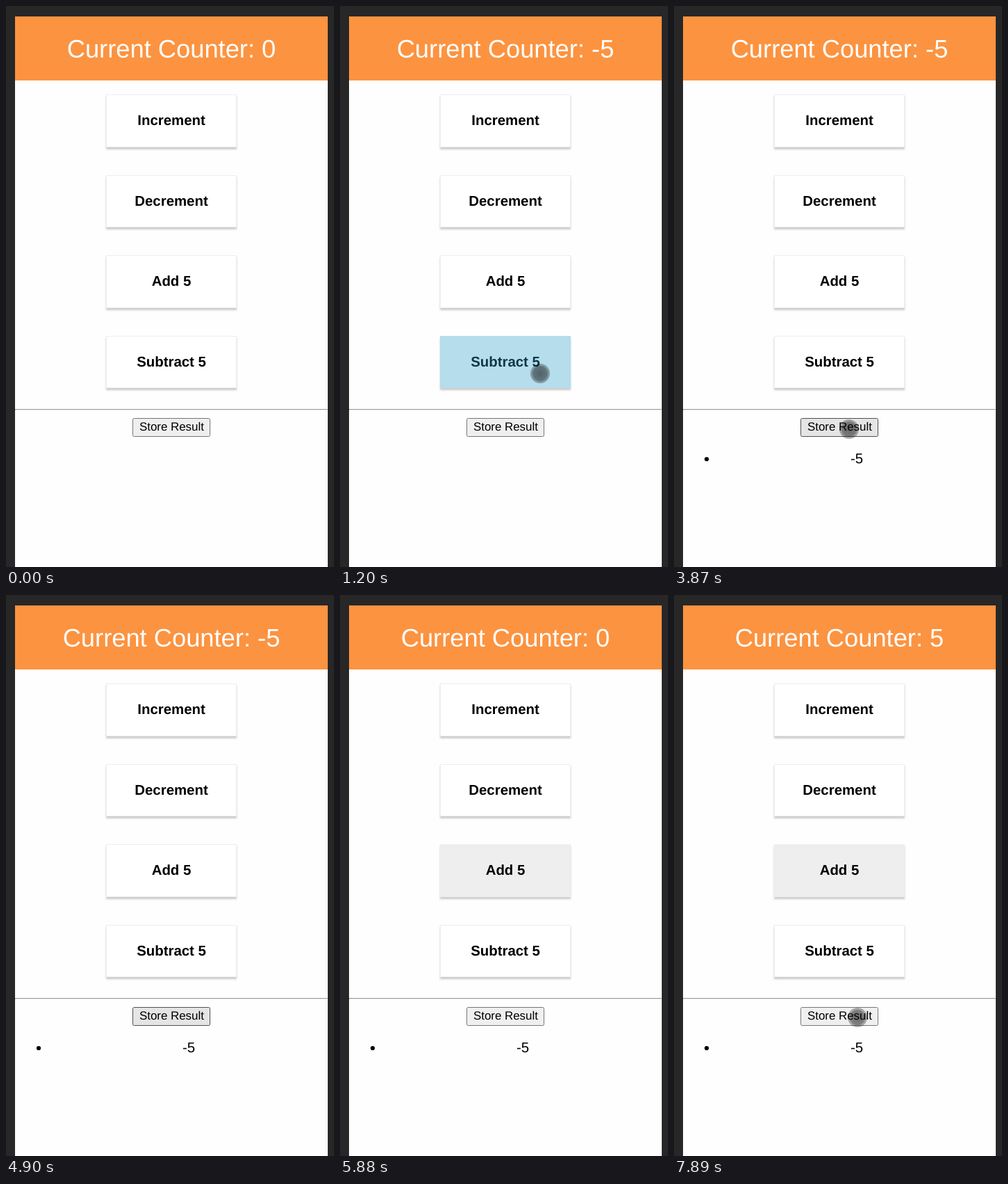
An HTML page that plays this animation: 472x806 px, repeating every 8000 ms.

```html
<!DOCTYPE html>
<html lang="en">
<head>
<meta charset="utf-8">
<title>Counter</title>
<style>
  html, body { margin: 0; width: 100%; height: 100%; overflow: hidden; background: #272727; }
  #stage { position: absolute; left: 0; top: 0; width: 472px; height: 806px; overflow: hidden; }
  #stage > * { position: absolute; box-sizing: border-box; }
  .page { left: 13px; top: 15px; width: 450px; height: 791px; background: #fefefe; }
  .head { left: 13px; top: 15px; width: 450px; height: 92px; background: #fc9340; }
  .card { left: 144px; width: 188px; background: #fff; border: 1px solid #eee; box-shadow: 0 2.5px 2.5px #ccc; }
  .card.hover { background: #eee; }
  .rule { left: 13px; top: 579px; width: 450px; height: 2px; border: 1px solid; border-color: #9a9a9a #eee #eee #9a9a9a; }
  .store { left: 182px; top: 592px; width: 112px; height: 27px; border: 1px solid #767676; border-radius: 2.5px; background: #efefef; }
  .store.hover { background: #e5e5e5; border-color: #4f4f4f; }
  .store.active { background: #f5f5f5; border-color: #8d8d8d; }
  svg { left: 0; top: 0; }
  text { font-family: "Liberation Sans", Arial, sans-serif; text-anchor: middle; text-rendering: geometricPrecision; }
  .title { font-size: 36.3px; fill: #fff; }
  .label { font-size: 20.4px; font-weight: bold; }
  .small { font-size: 16.9px; }
  .item { font-size: 20.4px; }
</style>
</head>
<body>
<div id="stage">
  <div class="page"></div>
  <div class="head"></div>
  <div class="rule"></div>
  <div class="store" id="store"></div>
  <svg id="art" width="472" height="806" viewBox="0 0 472 806">
    <defs>
      <radialGradient id="touch">
        <stop offset="0" stop-opacity=".55"/>
        <stop offset=".74" stop-opacity=".47"/>
        <stop offset=".82" stop-opacity=".33"/>
        <stop offset="1" stop-opacity=".27"/>
      </radialGradient>
    </defs>
    <text class="title" id="title" x="238" y="73.5"></text>
    <g id="labels"></g>
    <text class="small" x="238.4" y="610">Store Result</text>
    <g id="list">
      <circle cx="47" cy="651" r="3.1"/>
      <text class="item" x="263" y="657">-5</text>
    </g>
    <rect id="flash" x="144" width="188" fill="rgb(51,181,229)"/>
    <circle id="dot" r="14" fill="url(#touch)"/>
  </svg>
</div>
<script>
const LOOP = 8000;
const $ = id => document.getElementById(id);

// label, top, height
const cards = [
  ['Increment', 127, 76],
  ['Decrement', 243, 75],
  ['Add 5', 358, 76],
  ['Subtract 5', 474, 75]
].map(([name, top, height]) => {
  const box = document.createElement('div');
  box.className = 'card';
  box.style.top = top + 'px';
  box.style.height = height + 'px';
  $('stage').insertBefore(box, $('art'));
  const text = document.createElementNS('http://www.w3.org/2000/svg', 'text');
  text.setAttribute('class', 'label');
  text.setAttribute('x', 238);
  text.setAttribute('y', top + 44);
  text.textContent = name;
  $('labels').append(text);
  return { box, top, height };
});

const ADD = 2, SUB = 3;
const subAt = [288, 528], addAt = [274, 391], storeAt = [252, 608];
const off = { dot: null };

// each step changes part of the state
const steps = [
  [0, { dot: null, count: 0, hover: -1, flash: 0, store: '', list: false }],
  [370, { dot: [301, 537] }],
  [420, off],
  [1060, { dot: subAt, hover: SUB }],
  [1110, { flash: .4 }],
  [1160, { count: -5 }],
  [1200, { flash: .3 }],
  [1230, { flash: .14 }],
  [1270, { flash: 0 }],
  [1630, off],
  [1760, { dot: [253, 588] }],
  [1800, off],
  [2040, { dot: [252, 603] }],
  [2070, off],
  [2770, { dot: storeAt, hover: -1, store: 'active' }],
  [2930, { store: 'hover' }],
  [3870, { list: true }],
  [3930, off],
  [4630, { dot: [281, 372] }],
  [4670, off],
  [4810, { dot: [276, 378] }],
  [4840, { dot: [275, 381] }],
  [4870, { dot: [274, 383] }],
  [4900, off],
  [5310, { dot: addAt, hover: ADD, store: '' }],
  [5350, { flash: .4 }],
  [5400, { flash: .3, count: 0 }],
  [5440, { flash: .14 }],
  [5470, { flash: 0 }],
  [5880, off],
  [5960, { dot: addAt }],
  [6150, { flash: .4 }],
  [6200, { flash: .2, count: 5 }],
  [6250, { flash: 0 }],
  [6620, off],
  [7560, { dot: [265, 617] }],
  [7600, off],
  [7790, { dot: [264, 610] }],
  [7830, off],
  [7890, { dot: [264, 607] }]
];

function stateAt(t) {
  const past = steps.filter(([start]) => start <= t);
  return Object.assign({}, ...past.map(([, change]) => change));
}

function draw(t) {
  const s = stateAt(t);
  $('title').textContent = 'Current Counter: ' + s.count;
  cards.forEach((card, i) => card.box.classList.toggle('hover', i === s.hover));
  $('store').className = 'store ' + s.store;
  $('list').style.display = s.list ? '' : 'none';
  const lit = cards[s.hover];
  $('flash').style.opacity = lit ? s.flash : 0;
  if (lit) {
    $('flash').setAttribute('y', lit.top);
    $('flash').setAttribute('height', lit.height);
  }
  $('dot').style.display = s.dot ? '' : 'none';
  if (s.dot) $('dot').setAttribute('transform', `translate(${s.dot})`);
}

function tick() {
  draw(performance.now() % LOOP);
  requestAnimationFrame(tick);
}
tick();
</script>
</body>
</html>
```
